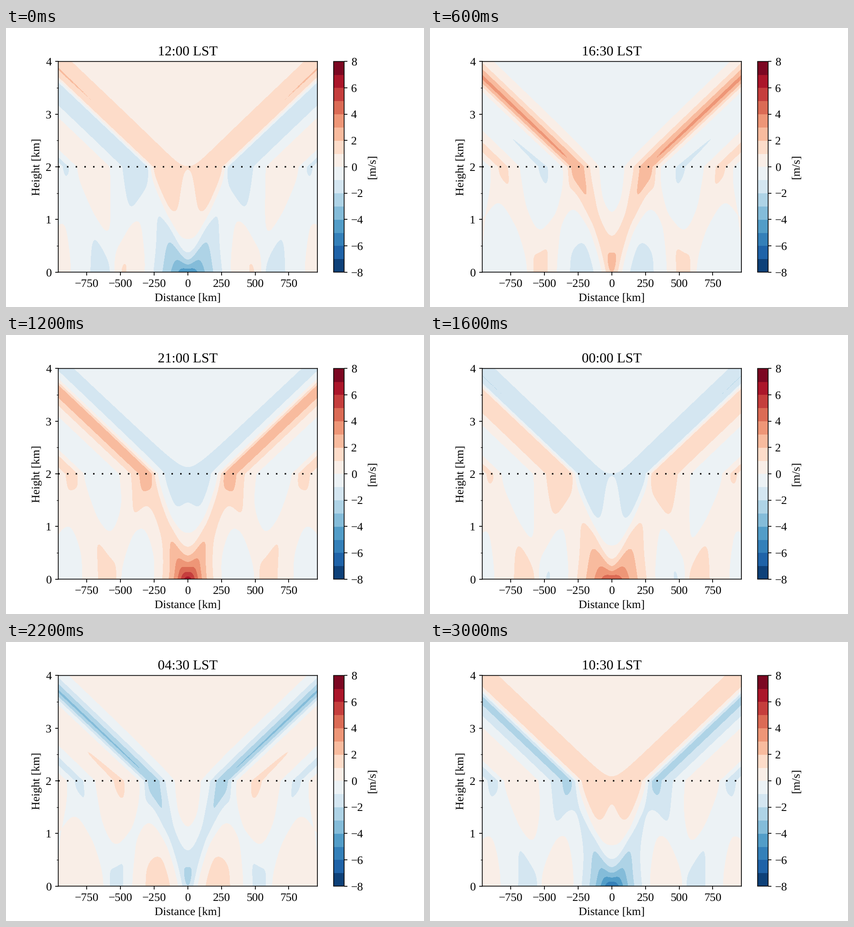
A matplotlib script for the animation above (3200 ms loop, 917x611 px).

```python
import numpy as np
import matplotlib.pyplot as plt
from matplotlib.animation import FuncAnimation
from matplotlib.ticker import MultipleLocator

WIDTH, HEIGHT = 917, 611
DPI = WIDTH / 6
FRAMES = 16

plt.rcParams.update({
    "font.family": "Liberation Serif",
    "font.size": 12,
    "axes.titlesize": 14.4,
    "text.hinting": "no_hinting",
    "path.snap": False,
})

# Linear, hydrostatic sea breeze at the equator with two stable layers.
OMEGA = 2 * np.pi / 86400
N_LOW, N_RATIO = 0.01, 3        # stability below, and its jump above
DEPTH = 1000.0                  # heating depth [m]
TOP = 2.0                       # interface height / DEPTH
SCALE = N_LOW * DEPTH / OMEGA / 1000   # horizontal scale [km]
COAST = 50 / SCALE              # half-width of the heating contrast
SPEED = 1.2e-5 / (np.pi * N_LOW * OMEGA)


def wind_amplitude(x, z):
    """Complex amplitude of the horizontal wind on the (z, x) grid."""
    dk = 0.04
    k = (np.arange(1000) + 0.5) * dk
    z = z[:, None]
    r = N_RATIO
    low, high = 1 / (1 + k**2), 1 / (1 + (r * k)**2)
    fade = np.exp(-TOP)
    down = np.exp(-1j * k * TOP)

    # Match streamfunction and wind at the interface, radiation above.
    d = ((high - low) * (1j * r * k - 1) * fade
         + 1j * (r - 1) * k * low * down)
    d /= k * (np.cos(k * TOP) + 1j * r * np.sin(k * TOP))
    c = low * (fade - down) + d * np.sin(k * TOP) - high * fade

    below = (low * (-np.exp(-z) + 1j * k * np.exp(-1j * k * z))
             + d * k * np.cos(k * z))
    above = (-high * np.exp(-z)
             - 1j * r * k * c * np.exp(-1j * r * k * (z - TOP)))
    spectrum = np.where(z <= TOP, below, above) * np.exp(-COAST * k) * dk
    return SPEED * spectrum @ np.cos(np.outer(k, x))


x = np.linspace(-7, 7, 281)
z = np.linspace(0, 4, 201)
amplitude = wind_amplitude(x, z)
levels = np.arange(-8, 9)

fig, ax = plt.subplots(
    figsize=((WIDTH + 0.001) / DPI, (HEIGHT + 0.001) / DPI),
    dpi=DPI, facecolor="white")
fig.subplots_adjust(left=0.125, right=0.9, bottom=0.125, top=0.88)


def draw_wind(i):
    wind = (amplitude * np.exp(-2j * np.pi * i / FRAMES)).real
    return ax.contourf(x * SCALE, z, wind, levels=levels, cmap="RdBu_r")


def clock(i):
    minutes = (12 * 60 + 90 * i) % 1440
    return f"{minutes // 60:02d}:{minutes % 60:02d} LST"


filled = draw_wind(0)
ax.plot([x[0] * SCALE, x[-1] * SCALE], [TOP, TOP], color="black", lw=1.5,
        linestyle=(0, (1, 5)))
ax.set_xlim(x[0] * SCALE, x[-1] * SCALE)
ax.set_ylim(0, 4)
ax.set_xticks(np.arange(-750, 751, 250))
ax.yaxis.set_major_locator(MultipleLocator(1))
ax.yaxis.set_minor_locator(MultipleLocator(0.5))
ax.set_xlabel("Distance [km]")
ax.set_ylabel("Height [km]")
title = ax.set_title(clock(0))

bar = fig.colorbar(filled, ax=ax, ticks=np.arange(-8, 9, 2))
bar.set_label("[m/s]")
bar.ax.minorticks_off()


def update(i):
    global filled
    filled.remove()
    filled = draw_wind(i)
    title.set_text(clock(i))
    return filled, title


anim = FuncAnimation(fig, update, frames=FRAMES, interval=200,
                     init_func=lambda: (), repeat=True, repeat_delay=0,
                     blit=False)
plt.show()
```
